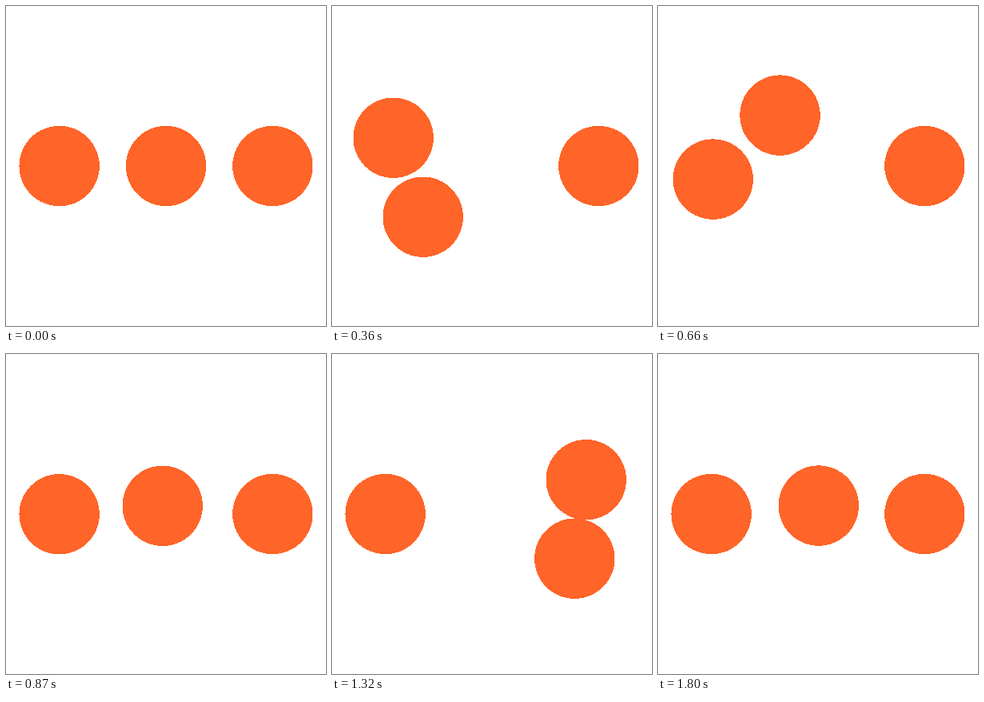
Animation, 400 px wide and 400 px high, one loop 1.83 s. Source, as an HTML page:

```html
<!DOCTYPE html>
<html lang="en">
<head>
<meta charset="utf-8">
<title>Juggling dots</title>
<style>
  html, body { margin: 0; width: 100%; height: 100%; overflow: hidden; background: #fff; }
  svg { display: block; width: 100%; height: 100%; }
  circle { fill: #ff6428; shape-rendering: crispEdges; }
</style>
</head>
<body>
<svg viewBox="0 0 400 400">
  <circle id="left" r="50.2" cx="66.67" cy="200"/>
  <circle id="middle" r="50.2" cx="200" cy="200"/>
  <circle id="right" r="50.2" cx="333.33" cy="200"/>
</svg>
<script>
const LOOP = 1830, STEP = 30;
const R = 200 / 3, MID = 200;
const LEFT_HUB = MID - R, RIGHT_HUB = MID + R;

const part = (t, from, to) => Math.min(1, Math.max(0, (t - from) / (to - from)));
const speedUp = u => u * u;
const slowDown = u => u * (2 - u);

// Point on a hub's circle, in quarter turns: 0 is right, 1 is down.
function orbit(hub, quarters) {
  const a = quarters * Math.PI / 2;
  return [hub + R * Math.cos(a), MID + R * Math.sin(a)];
}

// S-curve from the top of the left arc to the bottom of the right arc.
function sCurve(s) {
  const w = 1 - s, b = 3 * w * w * s, c = 3 * w * s * s, e = s * s * s;
  const reach = .58;
  return [LEFT_HUB + 2 * R * (reach * b + (1 - reach) * c + e),
          MID - R + 2 * R * (c + e)];
}

const balls = {
  // Speeds up over the left arc, crosses evenly, slows down under the right arc.
  left(t) {
    if (t < 605) return orbit(LEFT_HUB, 2 + speedUp(part(t, 0, 605)));
    if (t < 1195) return sCurve(part(t, 605, 1195));
    return orbit(RIGHT_HUB, 1 - slowDown(part(t, 1195, 1800)));
  },
  // Swings evenly down, then slows down into the left place.
  middle: t => orbit(LEFT_HUB, part(t, 0, 300) + slowDown(part(t, 300, 900))),
  // Speeds up to the top, then swings evenly into the middle place.
  right: t => orbit(RIGHT_HUB, -speedUp(part(t, 900, 1530)) - part(t, 1530, LOOP))
};

const start = performance.now();
function draw(now) {
  const t = Math.floor((Math.max(0, now - start) % LOOP) / STEP) * STEP;
  for (const id in balls) {
    const [x, y] = balls[id](t);
    const dot = document.getElementById(id);
    dot.setAttribute("cx", x.toFixed(2));
    dot.setAttribute("cy", y.toFixed(2));
  }
  requestAnimationFrame(draw);
}
draw(start);
</script>
</body>
</html>
```
